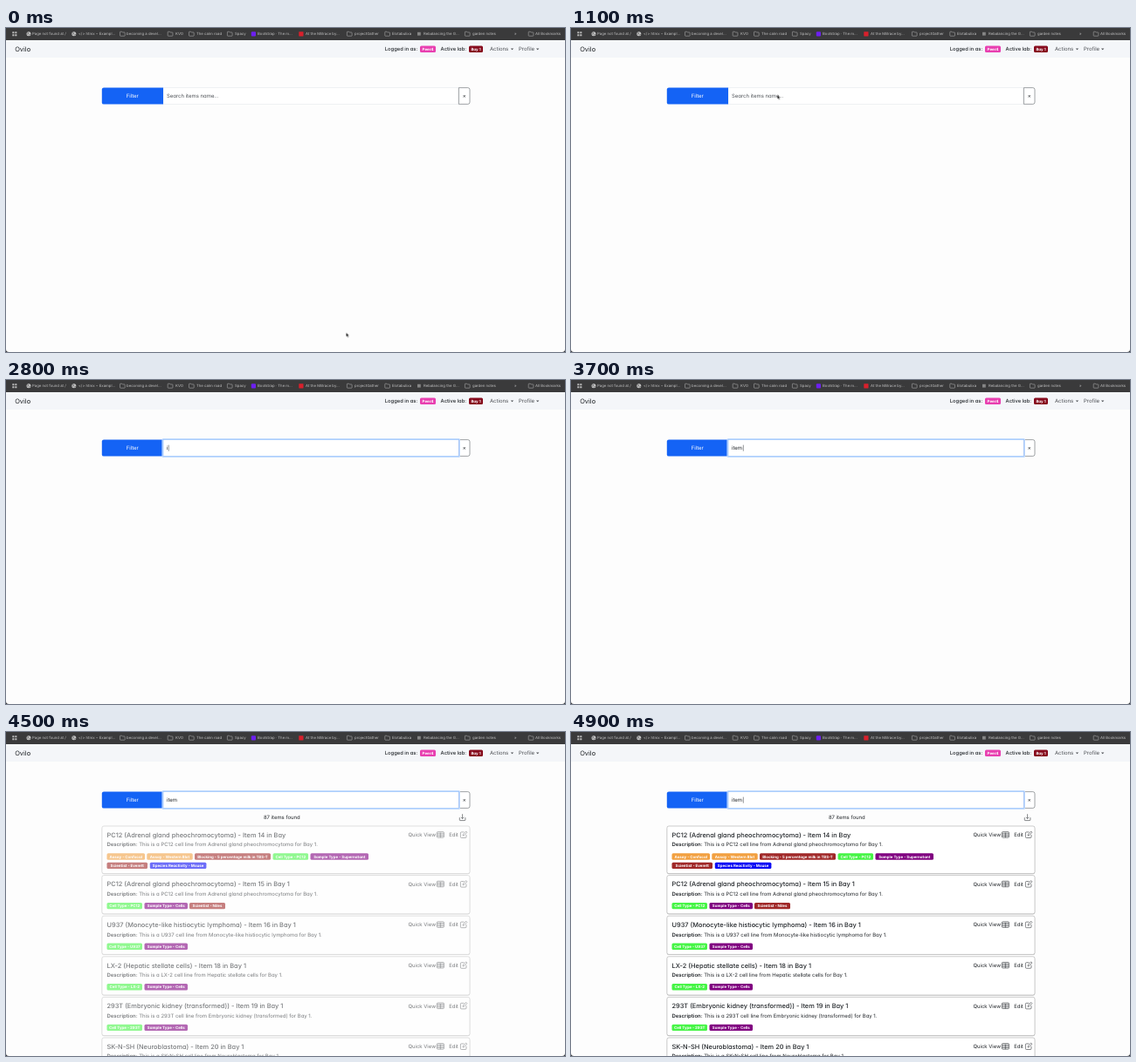
An HTML page that plays this animation: 640x372 px, repeating every 5 s.

```html
<!DOCTYPE html>
<html lang="en">
<head>
<meta charset="utf-8">
<title>Item search</title>
<style>
html, body { margin: 0; width: 100%; height: 100%; overflow: hidden; background: #fdfdfd; }
svg { display: block; width: 640px; height: 372px; }
text {
  font: 5.96px Inter, "Open Sans", sans-serif;
  font-feature-settings: "cv11";
  text-rendering: geometricPrecision;
  fill: #212529;
  white-space: pre;
}
.mark { font-size: 4.3px; fill: #c2c2c2; font-feature-settings: normal; }
.brand { font-size: 7.45px; }
.label { font-size: 5.8px; font-weight: 500; }
.link { fill: #4a4d52; }
.mid { text-anchor: middle; }
.title { font-size: 7.4px; font-weight: 500; }
.tag { font-size: 4.4px; font-weight: 700; fill: #fff; text-anchor: middle; }
.bold { font-weight: 600; }
.light { fill: #fff; }
.hint { fill: #4d5156; }
.line { fill: none; stroke: #33373b; stroke-width: .6; }
.card { fill: #fff; stroke: #9a9a9a; stroke-width: .5; }
.shade { fill: #000; opacity: .16; }

.arrow, .beam, .hint, .focus, .caret, .found, .cards, .key {
  animation: 5s step-end infinite;
}
.arrow { animation-name: travel, arrow; animation-timing-function: linear, step-end; }
.beam { animation-name: beam; }
.hint { animation-name: hint; }
.focus { animation-name: focus; animation-timing-function: ease-in-out; }
.caret { animation-name: blink, step; }
.found { animation-name: found; }
.cards { animation-name: cards; animation-timing-function: linear; }
.k1 { animation-name: k1; }
.k2 { animation-name: k2; }
.k3 { animation-name: k3; }
.k4 { animation-name: k4; }

@keyframes travel {
  0%, 2% { transform: translate(389.4px, 349.8px); animation-timing-function: cubic-bezier(.35, 0, .6, .9); }
  12% { transform: translate(250px, 92px); animation-timing-function: ease-out; }
  20%, 100% { transform: translate(236.2px, 76.8px); }
}
@keyframes arrow { 0% { visibility: visible } 26%, 100% { visibility: hidden } }
@keyframes beam { 0% { visibility: hidden } 26% { visibility: visible } 56%, 100% { visibility: hidden } }
@keyframes hint { 0% { visibility: visible } 56%, 100% { visibility: hidden } }
@keyframes focus { 0%, 44% { opacity: 0 } 47%, 100% { opacity: 1 } }
@keyframes blink {
  0% { visibility: hidden } 46% { visibility: visible }
  82% { visibility: hidden } 92%, 100% { visibility: visible }
}
@keyframes step {
  0% { transform: translateX(184.2px) }
  56% { transform: translateX(185.7px) }
  60% { transform: translateX(187.9px) }
  66% { transform: translateX(191.4px) }
  72%, 100% { transform: translateX(196.8px) }
}
@keyframes k1 { 0% { visibility: hidden } 56%, 100% { visibility: visible } }
@keyframes k2 { 0% { visibility: hidden } 60%, 100% { visibility: visible } }
@keyframes k3 { 0% { visibility: hidden } 66%, 100% { visibility: visible } }
@keyframes k4 { 0% { visibility: hidden } 72%, 100% { visibility: visible } }
@keyframes found { 0% { visibility: hidden } 80%, 100% { visibility: visible } }
@keyframes cards { 0%, 80% { opacity: 0 } 97%, 100% { opacity: 1 } }
</style>
</head>
<body>
<svg id="stage" viewBox="0 0 640 372" xmlns="http://www.w3.org/2000/svg"></svg>
<script>
const text = (x, y, s, cls = '') => `<text x="${x}" y="${y}" class="${cls}">${s}</text>`;
const rect = (x, y, w, h, fill, r = 0) =>
  `<rect x="${x}" y="${y}" width="${w}" height="${h}" rx="${r}" fill="${fill}"/>`;
const path = (d, attrs) => `<path d="${d}" ${attrs}/>`;

const GREEN = '#45f545', PURPLE = '#800080', BROWN = '#a02828', ORANGE = '#f2a040', BLUE = '#0a0af5';

// Bookmark icons, placed by their left edge
const icons = {
  folder: x => path(`M${x} 4.8q0-.6.6-.6h1.5l.8.8h2.2q.6 0 .6.6v3q0 .6-.6.6h-4.5q-.6 0-.6-.6z`,
    'fill="none" stroke="#b4b4b4" stroke-width=".55"'),
  globe: x => `<circle cx="${x + 2.6}" cy="6.8" r="2.5" fill="#c6c6c6"/>` +
    path(`M${x + 1} 5.3l1.6.5-.6 1.4-1.4-.3M${x + 3} 8.6l.6-1.3 1.2.2`, 'fill="none" stroke="#555" stroke-width=".6"'),
  purple: x => rect(x, 4.2, 5.2, 5.2, '#6d1ff0', 1),
  red: x => rect(x, 4.2, 5.2, 5.2, '#d8202c', .4),
  grey: x => rect(x, 4.8, 3.8, 3.8, '#858585')
};

const marks = [
  ['globe', 23.4, 30, 'Page not found at /'],
  ['globe', 75.2, 83, '&lt;/&gt; htmx ~ Exampl...'],
  ['folder', 130.5, 138, 'becoming a devel...'],
  ['folder', 185.2, 194, 'KVO'],
  ['folder', 209.5, 218, 'The calm road'],
  ['folder', 253.4, 262, 'Spacy'],
  ['purple', 280.8, 288, 'Bootstrap · The m...'],
  ['red', 335.3, 343, 'At the Millrace by...'],
  ['folder', 390.4, 399, 'projectGather'],
  ['folder', 433.8, 442, 'Elotabulixa'],
  ['grey', 471, 478, 'Rebalancing the G...'],
  ['folder', 525.4, 534, 'garden notes'],
  ['folder', 598.2, 606, 'All Bookmarks']
];

const dots = () => {
  let s = '';
  for (let i = 0; i < 4; i++)
    s += rect(7.3 + i % 2 * 3, 4.2 + (i >> 1) * 3, 2.1, 2.1, '#bdbdbd', .3);
  return s;
};

const bar = () => rect(0, 0, 640, 14, '#3a3a3b') + dots() +
  marks.map(([icon, x, tx, s]) => icons[icon](x) + text(tx, 8.4, s, 'mark')).join('') +
  text(582, 8.3, '»', 'mark');

const tag = (x, y, w, fill, s) =>
  rect(x, y, w, 7.4, fill, 1.5) + text(x + w / 2, y + 5.3, s, 'tag');

const drop = x => path(`M${x} 23.4h3.4l-1.7 1.8z`, 'fill="#4a4d52"');

const nav = () => rect(0, 14, 640, 20, '#f4f6f9') +
  text(10.2, 26.7, 'Ovilo', 'brand') +
  text(433.8, 26.3, 'Logged in as:', 'label') + tag(474, 20.5, 18, '#e83fb0', 'Peer4') +
  text(497.6, 26.3, 'Active lab:', 'label') + tag(530, 20.5, 16, '#860a1c', 'Bay 1') +
  text(554, 26.3, 'Actions', 'link') + drop(577.8) +
  text(587, 26.3, 'Profile', 'link') + drop(607);

const search = () =>
  path('M180 68.5h338.4v19H180z', 'fill="#fff" stroke="#dee2e6" stroke-width=".5"') +
  path('M180 68.4h-68q-2.2 0-2.2 2.2v14.8q0 2.2 2.2 2.2h68z', 'fill="#1463f5"') +
  path('M518.4 68.6h10.4q2.2 0 2.2 2.2v14.4q0 2.2-2.2 2.2h-10.4z', 'fill="#fff" stroke="#60666b" stroke-width=".6"') +
  text(144.8, 80.1, 'Filter', 'mid light') +
  text(524.7, 79.9, '×', 'mid') +
  `<g class="focus">
    <rect x="179.2" y="67.7" width="340" height="20.6" rx=".8" fill="none" stroke="#c2dbfe" stroke-width="1.5"/>
    <rect x="180" y="68.5" width="338.4" height="19" fill="#fff" stroke="#86b7fe" stroke-width=".6"/>
  </g>` +
  text(184, 80.1, 'Search items name...', 'hint') +
  text(184, 80.1, [...'item'].map((c, i) => `<tspan class="key k${i + 1}">${c}</tspan>`).join('')) +
  `<rect class="caret" y="74.6" width=".5" height="7" fill="#212529"/>`;

const found = () => `<g class="found">` + text(315.8, 100.2, '87 items found', 'mid') +
  path('M519.3 98.2v2.6q0 .8.8.8h5q.8 0 .8-.8v-2.6M522.6 94.2v5.2M520.9 97.8l1.7 1.7 1.7-1.7', 'class="line"') + '</g>';

const tableIcon = y => `<rect x="493.4" y="${y}" width="8" height="6.6" rx=".9" class="line"/>` +
  path(`M493.4 ${y + 1.6}h8M493.4 ${y + 3.3}h8M493.4 ${y + 5}h8M497.4 ${y + 1}v5.6`, 'class="line"');

const editIcon = y =>
  path(`M524.4 ${y + 1}h-3q-1 0-1 1v4.6q0 1 1 1h4.6q1 0 1-1v-2.6`, 'class="line"') +
  path(`M523 ${y + 5.2}l.5-1.8 3.2-3.3 1.2 1.2-3.2 3.3z`, 'class="line"');

const cell = s => [115.5, 0, 40.5, GREEN, 'Cell Type - ' + s];
const sample = [158.5, 0, 49.5, PURPLE, 'Sample Type - Cells'];

// name, origin, item number, tags as [x, row, width, colour, text]
const items = [
  ['PC12', 'Adrenal gland pheochromocytoma', 14, [
    [115.5, 0, 43.5, ORANGE, 'Assay - Confocal'],
    [161.3, 0, 52.4, ORANGE, 'Assay - Western Blot'],
    [216, 0, 87, BROWN, 'Blocking - 5 percentage milk in TBS-T'],
    [305.6, 0, 40.5, GREEN, 'Cell Type - PC12'],
    [348.5, 0, 66.5, PURPLE, 'Sample Type - Supernatant'],
    [115.5, 1, 46.5, BROWN, 'Scientist - Everett'],
    [164.8, 1, 64.6, BLUE, 'Species Reactivity - Mouse']]],
  ['PC12', 'Adrenal gland pheochromocytoma', 15,
    [cell('PC12'), sample, [210, 0, 41, BROWN, 'Scientist - Niles']]],
  ['U937', 'Monocyte-like histiocytic lymphoma', 16, [cell('U937'), sample]],
  ['LX-2', 'Hepatic stellate cells', 18, [cell('LX-2'), sample]],
  ['293T', 'Embryonic kidney (transformed)', 19, [cell('293T'), sample]],
  ['SK-N-SH', 'Neuroblastoma', 20, [cell('SK-N-SH'), sample]]
];

const card = ([name, origin, no, tags], i) => {
  const y = i ? 164.6 + (i - 1) * 46.6 : 108, h = i ? 44.2 : 54.6;
  return `<rect x="109.8" y="${y + .7}" width="421.4" height="${h}" rx="2.2" class="shade"/>` +
    `<rect x="109.9" y="${y}" width="421.1" height="${h}" rx="2.1" class="card"/>` +
    text(115.5, y + 12.7, `${name} (${origin}) - Item ${no} in Bay${i ? ' 1' : ''}`, 'title') +
    text(115.5, y + 23.4, `<tspan class="bold">Description:</tspan> This is a ${name} cell line from ${origin} for Bay 1.`) +
    text(460.4, y + 12.2, 'Quick View') + tableIcon(y + 6.6) +
    text(507.2, y + 12.2, 'Edit') + editIcon(y + 5.9) +
    tags.map(([x, row, w, fill, s]) => tag(x, y + 31.3 + row * 10.4, w, fill, s)).join('');
};

const pointers = () =>
  path('M0 0v4.6l1.1-.9.8 1.7.9-.4-.8-1.7h1.4z', 'class="arrow" fill="#111" stroke="#fff" stroke-width=".35"') +
  path('M233.7 76.2q1 0 1 .8 0-.8 1-.8M234.7 77v4.4M233.7 82.2q1 0 1-.8 0 .8 1 .8',
    'class="beam" fill="none" stroke="#222" stroke-width=".6"');

const corners = () => path('M0 368.8q0 3.2 3.2 3.2H0zM640 368.8q0 3.2-3.2 3.2h3.2z', 'fill="#26282a"');

document.getElementById('stage').innerHTML =
  rect(0, 0, 640, 372, '#fdfdfd') + bar() + nav() + search() + found() +
  `<g class="cards">${items.map(card).join('')}</g>` + corners() + pointers();
</script>
</body>
</html>
```
